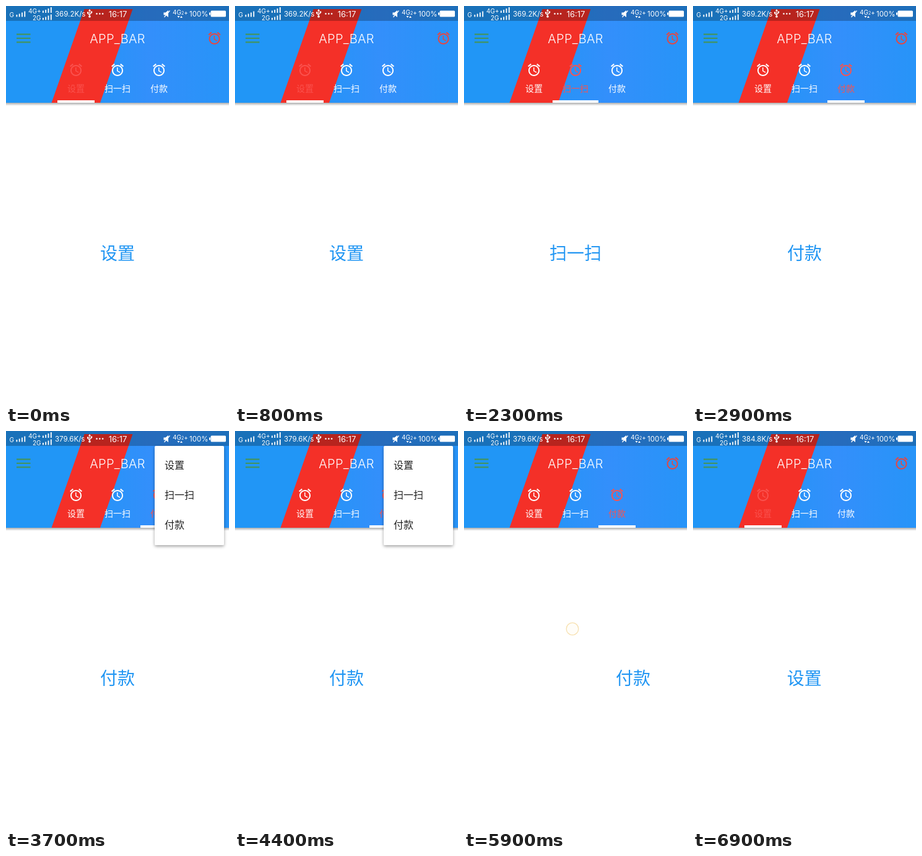
An HTML page for the animation above (7000 ms loop, 360x640 px).

```html
<!DOCTYPE html>
<html lang="zh-CN">
<head>
<meta charset="utf-8">
<style>
  html, body { margin: 0; width: 100%; height: 100%; overflow: hidden; background: #fff; }
  svg { display: block; width: 360px; height: 640px; font-family: Inter, "Noto Sans CJK SC", "Noto Sans CJK", sans-serif; }
  .mid { text-anchor: middle; }
  .page { font-size: 28px; fill: #2196f3; font-weight: 350; }
  .tab { font-size: 14px; }
  .item { font-size: 16px; fill: #212121; }
</style>
</head>
<body>
<svg viewBox="0 0 360 640">
  <defs>
    <linearGradient id="sky">
      <stop offset="0" stop-color="#2196f6"/>
      <stop offset=".3" stop-color="#2196f6"/>
      <stop offset=".65" stop-color="#338ffb"/>
      <stop offset="1" stop-color="#2794f8"/>
    </linearGradient>
    <linearGradient id="fade" x2="0" y2="1">
      <stop offset="0" stop-opacity=".32"/>
      <stop offset="1" stop-opacity="0"/>
    </linearGradient>
    <filter id="shadow" x="-20%" y="-20%" width="140%" height="140%">
      <feDropShadow dx="0" dy="2" stdDeviation="2.5" flood-opacity=".38"/>
    </filter>
    <path id="alarm" d="M22 5.72l-4.6-3.86-1.29 1.53 4.6 3.86L22 5.72zM7.88 3.39L6.6 1.86 2 5.71l1.29 1.53 4.59-3.85zM12.5 8H11v6l4.75 2.85.75-1.23-4-2.37V8zM12 4c-4.97 0-9 4.03-9 9s4.02 9 9 9c4.97 0 9-4.03 9-9s-4.03-9-9-9zm0 16c-3.87 0-7-3.13-7-7s3.13-7 7-7 7 3.13 7 7-3.13 7-7 7z"/>
    <path id="bars" d="M0 9V5.5h1.8V9zM4.3 9V4h1.8v5zM8.6 9V2h1.8v7zM12.9 9V0h1.8v9z"/>
  </defs>

  <rect width="360" height="640" fill="#fff"/>
  <g id="pages"></g>
  <circle id="touch" r="9.8" fill="#fffdf8" stroke="#f7e0ae" stroke-width="1.3"/>

  <rect y="156" width="360" height="5" fill="url(#fade)"/>
  <rect width="360" height="156" fill="url(#sky)"/>
  <path d="M126.5 5H204.500L152 156H73.500z" fill="#f43028"/>
  <rect width="360" height="24" opacity=".25"/>

  <path d="M17 45.700h22.500M17 52h22.500M17 58.300h22.500" stroke="#43945e" stroke-width="2.2"/>
  <text class="mid" x="180" y="60" font-size="20" font-weight="300" letter-spacing=".3" fill="#fff">APP_BAR</text>
  <use href="#alarm" x="324.500" y="40" fill="#e8463f"/>
  <g id="tabs"></g>
  <rect id="indicator" y="152" height="4" fill="#fff"/>

  <g fill="#fff">
    <text x="5.500" y="17.500" font-size="10">G</text>
    <use href="#bars" x="16.500" y="8.500"/>
    <text x="36" y="11.500" font-size="10">4G+</text>
    <use href="#bars" x="59" y="2"/>
    <text x="43" y="23" font-size="10">2G</text>
    <use href="#bars" x="59" y="13.500"/>
    <text id="speed" x="79" y="17" font-size="11.500"></text>
    <path d="M135 5l2 3h-4zM131 9.500h2.400v2.400H131zM136.800 8.500h2.400v2.400h-2.400z"/>
    <circle cx="135" cy="17" r="1.800"/>
    <path d="M135 7v10M132.200 11v1.500l2.800 2M138 10v1.500l-3 2" fill="none" stroke="#fff" stroke-width="1.100"/>
    <circle cx="146.500" cy="12.500" r="1.300"/><circle cx="151.300" cy="12.500" r="1.300"/><circle cx="156.100" cy="12.500" r="1.300"/>
    <text class="mid" x="180.500" y="17.500" font-size="13">16:17</text>
    <path d="M254.500 10.500h3L262 7v11l-4.500-3.500h-3z"/>
    <path d="M264.500 7.500L255.500 18" stroke="#fff" stroke-width="1.300"/>
    <text x="269" y="14" font-size="10">4G<tspan font-size="7">2</tspan>+</text>
    <path d="M276.500 16h4l-2 3zM281 19h4l-2-3z"/>
    <text x="296" y="17" font-size="11.500">100%</text>
    <rect x="330.500" y="7.500" width="24.500" height="10" rx="1.500"/>
    <rect x="328" y="10.500" width="2" height="4"/>
  </g>

  <g id="menu">
    <rect id="sheet" y="24" rx="2" fill="#fff" filter="url(#shadow)"/>
    <g id="items"></g>
  </g>
</svg>
<script>
const LOOP = 7000;
const LABELS = ["设置", "扫一扫", "付款"];
const TAB_X = [113, 180, 247];
const TAB_EDGES = [83, 143, 217, 277];
const $ = id => document.getElementById(id);

const linear = k => k;
const ease = k => k * k * (3 - 2 * k);
const easeOut = k => 1 - (1 - k) ** 3;
const mix = (a, b, k) => a + (b - a) * k;
const ramp = (t, from, to) => Math.min(1, Math.max(0, (t - from) / (to - from)));

// Each move is [start, end, target value, easing].
const PAGE_MOVES = [
  [1300, 1600, 1, ease], [2300, 2600, 2, ease],
  [5700, 5900, 1.744, linear], [5900, 6000, 1.5, linear], [6000, 6250, 1, easeOut],
  [6350, 6550, .5, linear], [6550, 6950, 0, easeOut]
];
const TAB_MOVES = [
  [1300, 1600, 1, ease], [2300, 2600, 2, ease], [6020, 6250, 1, ease], [6560, 6800, 0, ease]
];
const DRAGS = [[5700, 6000, 2], [6350, 6550, 1]];

function follow(moves, t) {
  return moves.reduce((value, [start, end, target, curve]) =>
    mix(value, target, curve(ramp(t, start, end))), 0);
}

const add = (parent, markup) => {
  $(parent).insertAdjacentHTML("beforeend", markup);
  return $(parent).lastElementChild;
};
const pages = LABELS.map(s => add("pages", `<text class="page mid" y="408.500">${s}</text>`));
const tabs = LABELS.map((s, i) => add("tabs",
  `<g><use href="#alarm" x="${TAB_X[i] - 12}" y="91"/><text class="tab mid" x="${TAB_X[i]}" y="138.200">${s}</text></g>`));
const items = LABELS.map((s, i) => add("items", `<text class="item" x="256" y="${60.5 + i * 48}">${s}</text>`));

function drawMenu(t) {
  const open = ramp(t, 3350, 3650);
  const shown = Math.min(1, open * 3) * (1 - ramp(t, 4500, 4700));
  const width = 112 * Math.min(1, .4 + open * 1.2);
  $("menu").setAttribute("opacity", shown);
  $("sheet").setAttribute("x", 352 - width);
  $("sheet").setAttribute("width", width);
  $("sheet").setAttribute("height", 160 * ease(open));
  items.forEach((item, i) => item.setAttribute("opacity", ramp(open, .2 + i * .2, .5 + i * .2)));
}

function draw(t) {
  const page = follow(PAGE_MOVES, t);
  pages.forEach((text, i) => text.setAttribute("x", 180 + (i - page) * 360));

  const tab = follow(TAB_MOVES, t);
  tabs.forEach((g, i) => {
    const k = Math.max(0, 1 - Math.abs(tab - i));
    g.setAttribute("fill", `rgb(${mix(255, 250, k)},${mix(255, 82, k)},${mix(255, 78, k)})`);
  });
  const left = Math.min(1, Math.floor(tab));
  const edge = n => mix(TAB_EDGES[left + n], TAB_EDGES[left + n + 1], tab - left);
  $("indicator").setAttribute("x", edge(0));
  $("indicator").setAttribute("width", edge(1) - edge(0));

  const drag = DRAGS.find(([start, end]) => t >= start && t < end);
  $("touch").setAttribute("visibility", drag ? "visible" : "hidden");
  if (drag) {
    $("touch").setAttribute("cx", 82 + (drag[2] - page) * 360);
    $("touch").setAttribute("cy", 319);
  }

  $("speed").textContent = (t < 3300 ? "369.2" : t < 6300 ? "379.6" : "384.8") + "K/s";
  drawMenu(t);
}

const began = performance.now();
function tick() {
  draw((performance.now() - began) % LOOP);
  requestAnimationFrame(tick);
}
tick();
</script>
</body>
</html>
```
